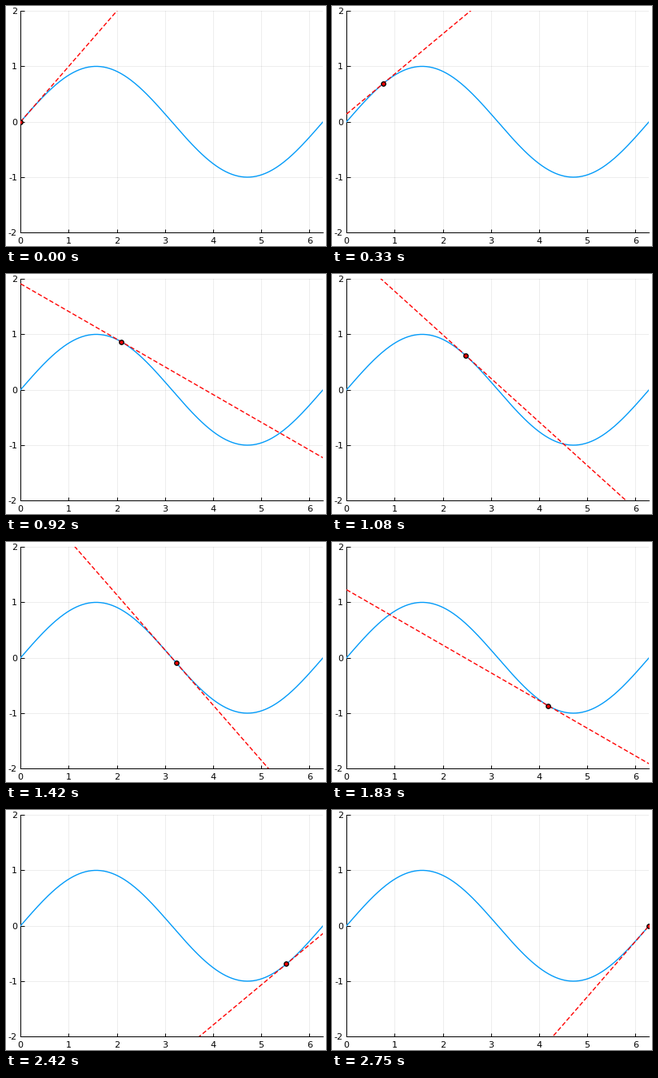
Write a matplotlib script that moves like this. It is 400 px wide and 300 px high and loops after 2830 ms.

```python
import numpy as np
import matplotlib.pyplot as plt
from matplotlib.animation import FuncAnimation

W, H, DPI = 400, 300, 100
LEFT, RIGHT, TOP, BOTTOM = 18.2, 396.3, 6.2, 283.2
STEPS = 34          # poses per loop
FPS = 12
TICK_MS = 10
LOOP_MS = 2830
END = 2 * np.pi


def px(n):
    """Pixels to points."""
    return n * 72 / DPI


def label(x, y, text, ha):
    fig.text(x / W, 1 - y / H, text, ha=ha, va="baseline",
             family="DejaVu Sans", size=8, color="black")


fig = plt.figure(figsize=(W / DPI, H / DPI), dpi=DPI, facecolor="white")
ax = fig.add_axes([LEFT / W, 1 - BOTTOM / H,
                   (RIGHT - LEFT) / W, (BOTTOM - TOP) / H])
ax.set_xlim(0, END)
ax.set_ylim(-2, 2)
ax.set_xticks(range(7), labels=[])
ax.set_yticks(range(-2, 3), labels=[])
ax.tick_params(direction="in", length=px(4.5), width=px(1), color="black")
ax.grid(color="black", alpha=0.09, linewidth=px(0.8))
ax.set_axisbelow(True)
ax.spines[["top", "right"]].set_visible(False)
ax.spines[["left", "bottom"]].set_linewidth(px(1))

for n in range(7):
    label(LEFT + n * (RIGHT - LEFT) / END, 297, str(n), "center")
for n in range(-2, 3):
    label(14, (TOP + BOTTOM) / 2 - n * (BOTTOM - TOP) / 4 + 4, str(n), "right")

xs = np.linspace(0, END, 300)
ax.plot(xs, np.sin(xs), color="#009af9", linewidth=1, zorder=3)
tangent, = ax.plot([], [], color="red", linewidth=1, dashes=(4, 2),
                   dash_capstyle="butt", zorder=4)
point, = ax.plot([], [], "o", markersize=px(5.4), markerfacecolor="red",
                 markeredgecolor="black", markeredgewidth=px(1.35), zorder=5)


def update(i):
    step = (i * TICK_MS + 5) * FPS // 1000
    a = END * step / (STEPS - 1)
    ends = np.array([0, END])
    tangent.set_data(ends, np.sin(a) + np.cos(a) * (ends - a))
    point.set_data([a], [np.sin(a)])
    return tangent, point


anim = FuncAnimation(fig, update, frames=LOOP_MS // TICK_MS,
                     interval=TICK_MS, repeat=True, repeat_delay=0)
plt.show()
```
